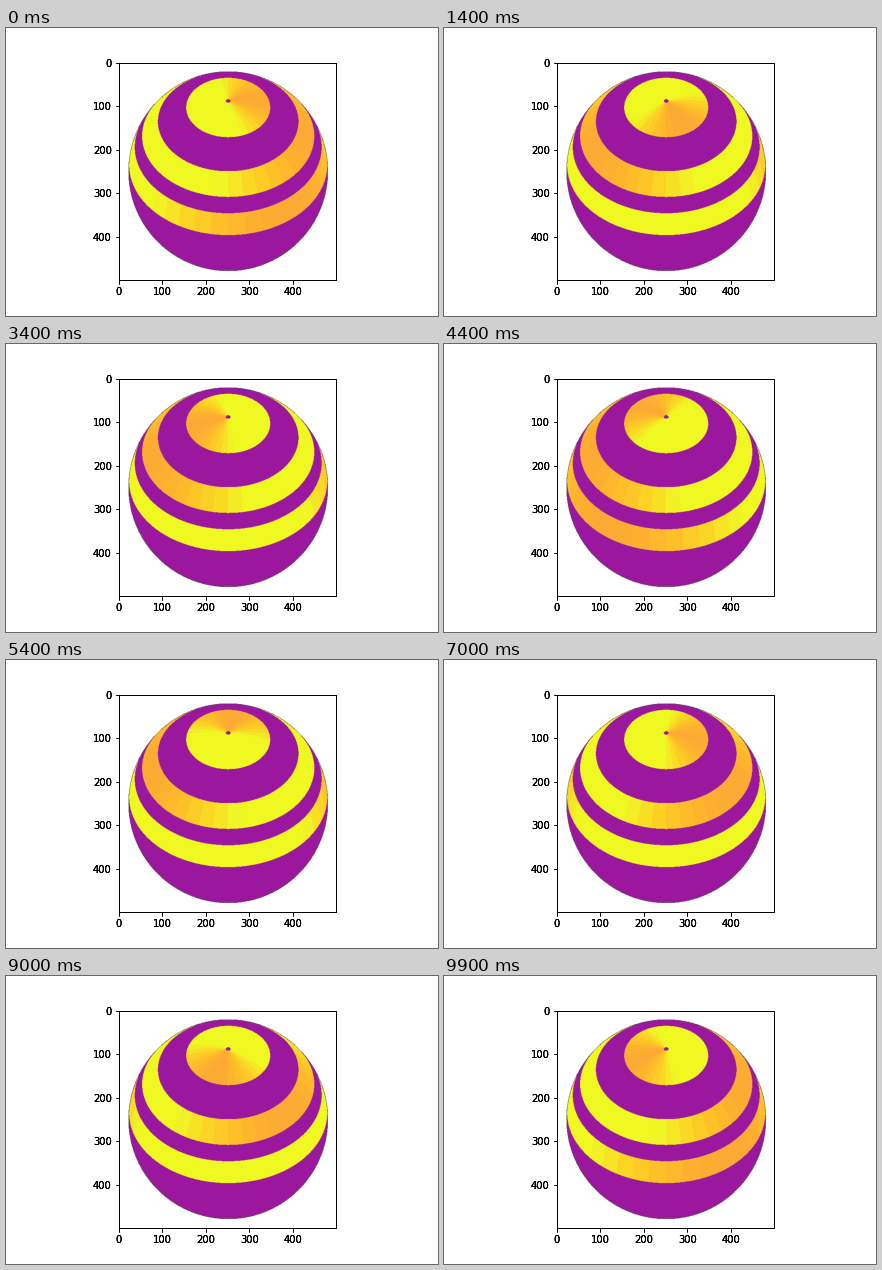
These frames come from a looping animation (432 px wide and 288 px high, 10 s). A matplotlib script:

```python
import matplotlib.pyplot as plt
import numpy as np
from matplotlib.animation import FuncAnimation

FRAMES, INTERVAL = 100, 100
SIZE, RADIUS = 500, 228
TILT = np.radians(45)
CELL = 10  # longitude cell width in degrees

# colatitude range, turns per loop, starting longitude of the darkest cell
BANDS = [
    (1.4, 25, 1.5, 107),
    (45, 60, 10, 82),
    (70, 85, 5, 40),
]

plt.rcParams.update({"font.family": "DejaVu Sans", "font.size": 10})
plasma = plt.get_cmap("plasma")


def sphere_grid():
    """Colatitude and longitude (degrees) for each pixel of the tilted sphere."""
    row, col = np.mgrid[:SIZE, :SIZE]
    x = (col - SIZE / 2) / RADIUS
    y = (SIZE / 2 - row) / RADIUS
    r = np.hypot(x, y)
    z = np.sqrt(np.clip(1 - r**2, 0, None))
    up = y * np.cos(TILT) + z * np.sin(TILT)
    front = z * np.cos(TILT) - y * np.sin(TILT)
    colat = np.degrees(np.arccos(np.clip(up, -1, 1)))
    lon = np.degrees(np.arctan2(x, front))
    return r, colat, lon


r, colat, lon = sphere_grid()
inside = r <= 1
cell = (np.floor(lon / CELL) + 0.5) * CELL

base = np.ones((SIZE, SIZE, 3))
base[inside] = plasma(1 / 3)[:3]
base[(r > 1) & (r <= 1 + 1 / RADIUS)] = 0.25

masks = [inside & (colat >= lo) & (colat < hi) for lo, hi, _, _ in BANDS]
cells = [cell[m] for m in masks]


def render(frame):
    img = base.copy()
    for mask, lons, (_, _, turns, start) in zip(masks, cells, BANDS):
        center = start - 360 * turns * frame / (FRAMES - 1)
        dip = np.clip(np.cos(np.radians(lons - center)), 0, None)
        img[mask] = plasma(1 - 0.19 * dip)[:, :3]
    return img


fig = plt.figure(figsize=(6, 4), dpi=72, facecolor="white")
side = 0.755 * 288
box = [(221.4 - side / 2) / 432, 0.125, side / 432, 0.755]


def add_axes():
    ax = fig.add_axes(box, facecolor="none")
    ax.set_xlim(-0.5, SIZE - 0.5)
    ax.set_ylim(SIZE - 0.5, -0.5)
    ax.set_xticks(range(0, SIZE, 100))
    ax.set_yticks(range(0, SIZE, 100))
    return ax


ax = add_axes()
picture = ax.imshow(render(0), aspect="auto")
# stacked axes give the heavy black labels and frame
for _ in range(2):
    add_axes()


def update(frame):
    picture.set_data(render(frame))
    return [picture]


anim = FuncAnimation(fig, update, frames=FRAMES, interval=INTERVAL,
                     repeat=True, repeat_delay=0, blit=False)
plt.show()
```
